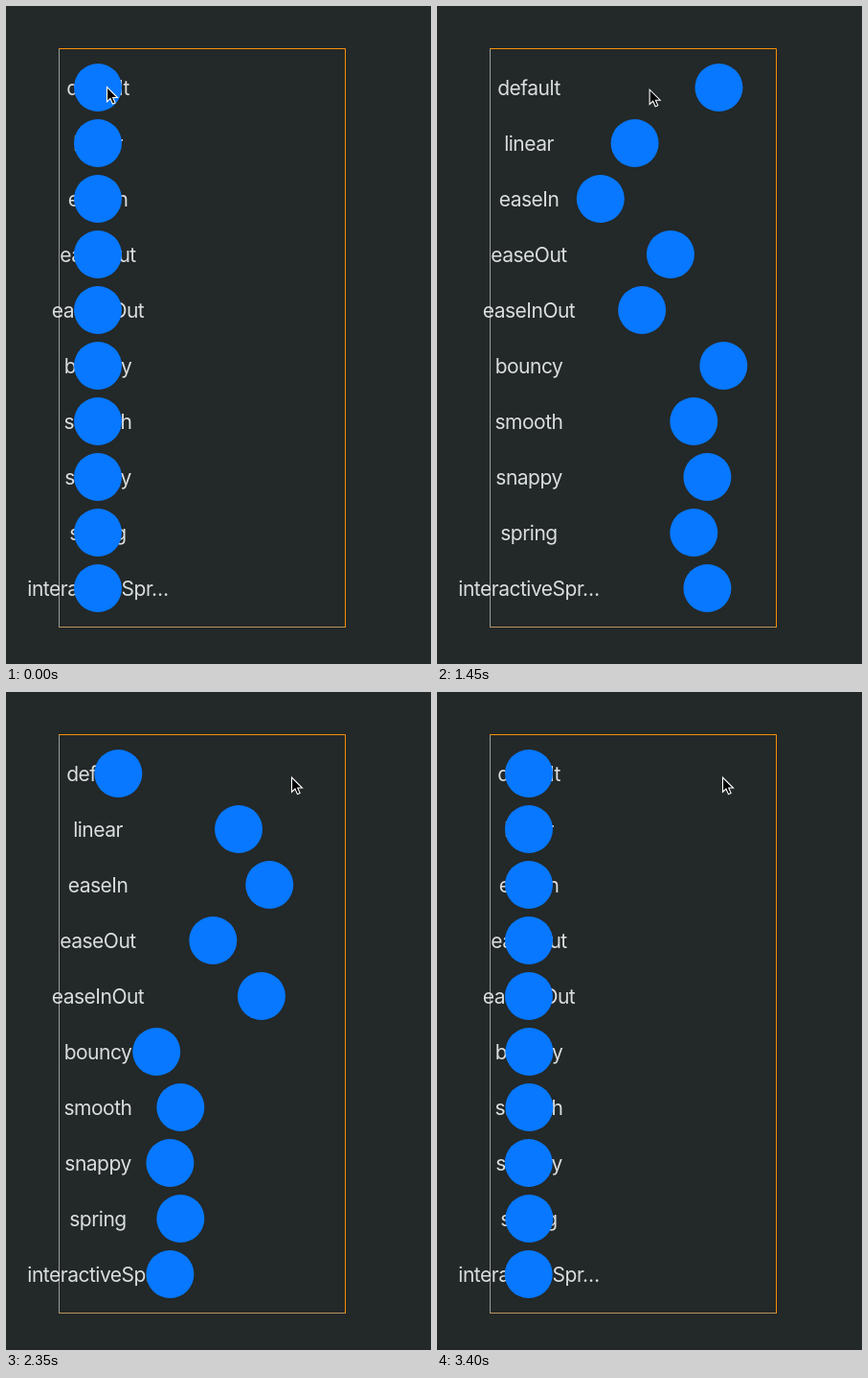
An HTML page for the animation above (3.45 s loop, 444 by 686 pixels).

```html
<!DOCTYPE html>
<html lang="en">
<head>
<meta charset="utf-8">
<title>Animation curves</title>
<style>
  html, body { margin: 0; width: 100%; height: 100%; overflow: hidden; background: #232828; }
  svg { display: block; }
  text { font: 21px Inter, sans-serif; letter-spacing: -0.5px; fill: #dcdede; text-anchor: middle; }
  circle { fill: #0778ff; }
</style>
</head>
<body>
<svg id="stage" width="444" height="686" viewBox="0 0 444 686">
  <g fill="none">
    <path d="M55.5 44V648" stroke="#9b9c9b"/>
    <path d="M55 647.5H355" stroke="#b8935c"/>
    <path d="M55 44.5H354.5V648" stroke="#f79009"/>
  </g>
  <g id="labels"></g>
  <g id="dots"></g>
  <path id="cursor" d="M0 0V15.2L3.5 12L6 17.6L8.6 16.4L6.2 11H11Z" fill="#000" stroke="#fff" stroke-width="1.1"/>
</svg>
<script>
const LOOP = 3450, STEP = 50;
const LEFT = 96, TRAVEL = 200, TOP = 85, ROW = 58;
const OUT = 897;

const clamp = v => Math.min(1, Math.max(0, v));

// Timing curve with end handles (x1, 0) and (x2, 1), lasting one second.
const ease = (x1, x2) => {
  const curve = t => {
    t = clamp(t);
    let low = 0, high = 1;
    for (let i = 0; i < 24; i++) {
      const s = (low + high) / 2, r = 1 - s;
      if (3 * x1 * s * r * r + 3 * x2 * s * s * r + s ** 3 < t) low = s;
      else high = s;
    }
    return low * low * (3 - 2 * low);
  };
  return { curve, back: 2085 };
};

// Step response of a damped spring.
const spring = (bounce = 0, duration = 1) => {
  const w = 2 * Math.PI / duration, damping = 1 - bounce;
  const root = Math.sqrt(1 - damping * damping);
  const curve = t => {
    if (t <= 0) return 0;
    const a = w * t;
    const swing = root
      ? Math.cos(root * a) + damping / root * Math.sin(root * a)
      : 1 + a;
    return 1 - Math.exp(-damping * a) * swing;
  };
  return { curve, back: 2047 };
};

const rows = [
  ["default", spring(0, 0.5)],
  ["linear", { curve: clamp, back: 2085 }],
  ["easeIn", ease(0.42, 1)],
  ["easeOut", ease(0, 0.58)],
  ["easeInOut", ease(0.42, 0.58)],
  ["bouncy", spring(0.3)],
  ["smooth", spring()],
  ["snappy", spring(0.15)],
  ["spring", spring()],
  ["interactiveSpr…", spring(0.15)]
];

const add = (parent, tag, attrs) => {
  const node = document.createElementNS("http://www.w3.org/2000/svg", tag);
  for (const key in attrs) node.setAttribute(key, attrs[key]);
  return document.getElementById(parent).appendChild(node);
};

const dots = rows.map(([name], i) => {
  const y = TOP + ROW * i;
  add("labels", "text", { x: LEFT, y: y + 8 }).textContent = name;
  return add("dots", "circle", { cx: LEFT, cy: y, r: 25 });
});
const cursor = document.getElementById("cursor");

function draw(ms) {
  rows.forEach(([, { curve, back }], i) => {
    const p = curve((ms - OUT) / 1000) - curve((ms - back) / 1000);
    dots[i].setAttribute("cx", LEFT + TRAVEL * p);
  });
  const k = clamp((ms - 1250) / 350), move = k * k * (3 - 2 * k);
  const x = 105.5 - clamp((ms - 100) / 300) + 194 * move;
  cursor.setAttribute("transform", `translate(${x} ${84.5 + 4.5 * move})`);
}

function tick() {
  draw(Math.floor(performance.now() % LOOP / STEP) * STEP);
  requestAnimationFrame(tick);
}
tick();
</script>
</body>
</html>
```
